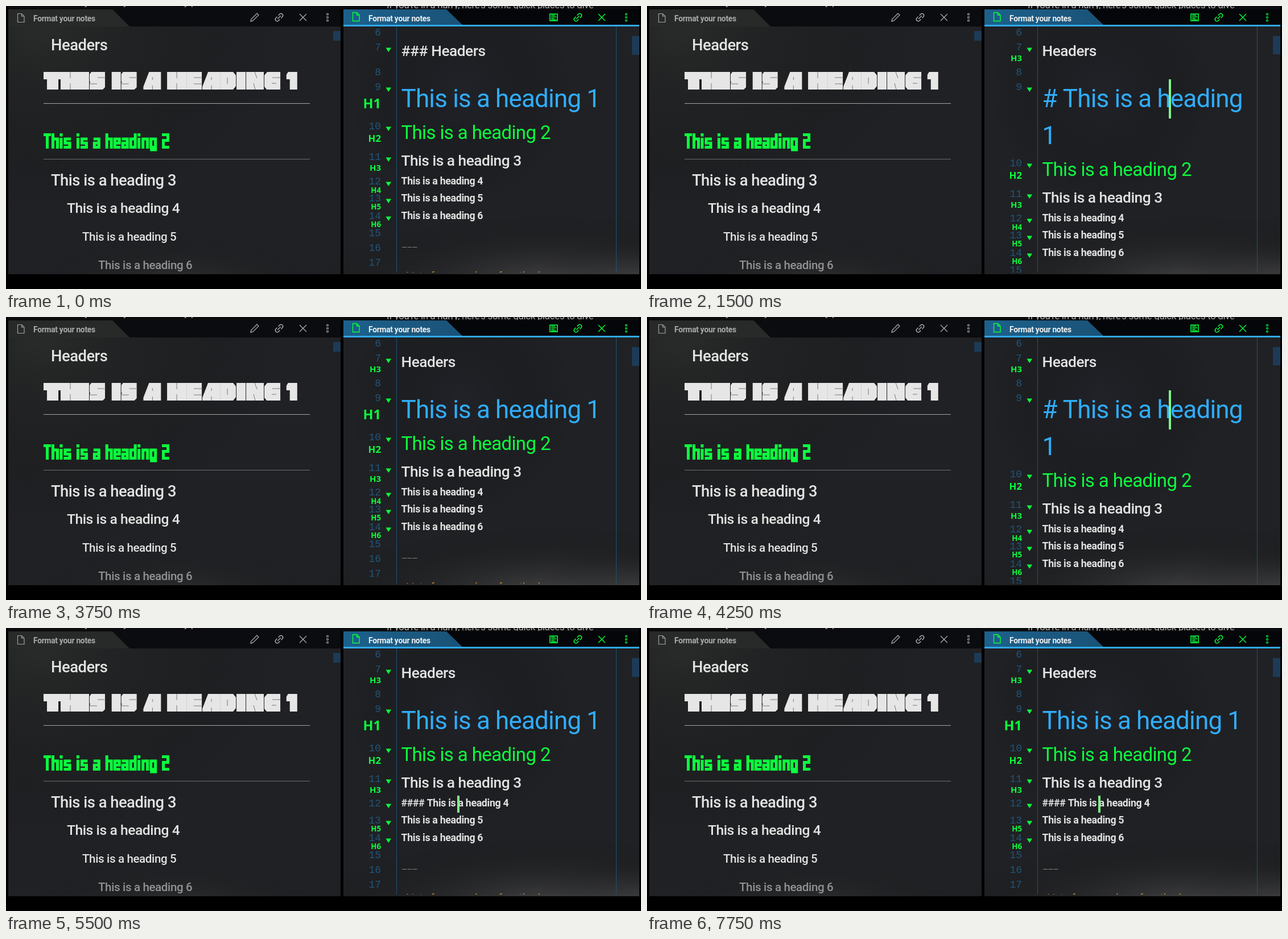
Write an HTML page with a canvas that moves like this. It is 1116 px wide and 498 px high and loops after 8 s.

```html
<!DOCTYPE html>
<html lang="en">
<head>
<meta charset="utf-8">
<title>Format your notes</title>
<style>
html, body { margin: 0; width: 100%; height: 100%; overflow: hidden; background: #000; }
canvas { display: block; }
</style>
</head>
<body>
<canvas id="stage" width="1116" height="498"></canvas>
<script>
const canvas = document.getElementById('stage');
let ctx = canvas.getContext('2d');

const LOOP = 8000;
const SANS = 'Roboto, "Open Sans", sans-serif';
const WIDE = '"Open Sans", "Noto Sans", sans-serif';
const MONO = '"Liberation Mono", monospace';
const GREEN = '#0cff3e', BLUE = '#30adfb', WHITE = '#e2e2e2';
const WRAP = 65; // extra height once the first heading breaks in two

// [start ms, line with the cursor, caret visible]
const STEPS = [
  [0, 7, 0], [250, 8, 1], [380, 9, 1], [880, 9, 0], [1500, 9, 1],
  [2000, 9, 0], [2130, 8, 1], [2750, 8, 0], [3250, 8, 1], [3750, 8, 0],
  [4250, 9, 1], [4880, 10, 1], [5000, 11, 1], [5500, 12, 1], [5880, 13, 1],
  [6380, 13, 0], [6500, 14, 1], [7000, 14, 0], [7250, 13, 1], [7750, 12, 1]
];

// caret: [x, top, bottom]
const LINES = [
  { n: 6, y: 52 },
  { n: 7, y: 78, level: 3, text: 'Headers', base: 88, tag: 97 },
  { n: 8, y: 122, caret: [693, 103, 129] },
  { n: 9, y: 148, level: 1, text: 'This is a heading 1', base: 178, tag: 180, caret: [917, 129, 198] },
  { n: 10, y: 217, level: 2, text: 'This is a heading 2', base: 234, tag: 239, caret: [862, 198, 252] },
  { n: 11, y: 271, level: 3, text: 'This is a heading 3', base: 281, tag: 290, caret: [838, 252, 295] },
  { n: 12, y: 314, level: 4, text: 'This is a heading 4', base: 314, tag: 329, caret: [793, 295, 325] },
  { n: 13, y: 344, level: 5, text: 'This is a heading 5', base: 344, tag: 358, caret: [798, 325, 356] },
  { n: 14, y: 375, level: 6, text: 'This is a heading 6', base: 375, tag: 389, caret: [801, 356, 386] },
  { n: 15, y: 405 }, { n: 16, y: 431 }, { n: 17, y: 457 }
];
const SIZE = [0, 44, 33, 26.3, 17.8, 17.8, 17.8];
const TAG = [0, 23.5, 16.8, 15, 13.3, 13.3, 13.3];

// Condensed lettering, drawn with a thick pen: [advance, path]
const THIN = {
  T: [14, 'M0 2.5H13M6.5 0V27'],
  h: [14, 'M2.5 0V27M2.5 10H10.5V27'],
  i: [7.5, 'M3 8V27M3 0V5.5'],
  s: [14, 'M12.5 10H2.5V17.2H10.5V24.5H0'],
  a: [14, 'M1 10H10.5V27M10.5 17.2H2.5V24.5H10.5'],
  e: [14, 'M12.5 24.5H2.5V10H10.5V17.2H2.5'],
  d: [14, 'M10.5 0V27M10.5 10H2.5V24.5H10.5'],
  n: [14, 'M2.5 27V10H10.5V27'],
  g: [14, 'M10.5 24.5H2.5V10H10.5V29H1'],
  2: [14, 'M0 2.5H10.5V12.5H2.5V24.5H13'],
  ' ': [7.9, '']
};
// Block lettering: [advance, outline, slits]
const BLOCK = {
  T: [30, 'M0 0H30V13H26V31H6V13H0Z', ''],
  H: [34, 'M0 0H34V31H0Z', 'M17 0V11M17 20V31'],
  I: [17, 'M0 0H16V31H0Z', ''],
  S: [28, 'M3 0H27V27L23 31H0V20L1 18L0 16V4Z', 'M14 10H28M0 21H13'],
  A: [31, 'M10 0H31V31H0V26Z', 'M16 24V31M16 9V14'],
  E: [28, 'M0 0H27V31H0Z', 'M13 10H28M13 21H28'],
  D: [29, 'M0 0H23L28 6V25L23 31H0Z', 'M13 10V21'],
  N: [32, 'M0 0H31V31H0Z', 'M15 0L19 11M13 20L16 31'],
  G: [28, 'M5 0H28V31H4L0 26V6Z', 'M14 10H28M13 20H21'],
  1: [19, 'M3 0H19V31H6V13H0V5Z', ''],
  ' ': [10.7, '', '']
};

function rect(x, y, w, h, color) {
  ctx.fillStyle = color;
  ctx.fillRect(x, y, w, h);
}

function poly(color, ...pts) {
  ctx.fillStyle = color;
  ctx.beginPath();
  for (const [x, y] of pts) ctx.lineTo(x, y);
  ctx.fill();
}

function label(str, x, y, size, color, weight = 400, family = SANS) {
  ctx.font = `${weight} ${size}px ${family}`;
  ctx.letterSpacing = family === SANS ? `${-0.019 * size}px` : '0px';
  ctx.fillStyle = color;
  ctx.fillText(str, x, y);
}

function rightLabel(str, x, ...rest) {
  ctx.textAlign = 'right';
  label(str, x, ...rest);
  ctx.textAlign = 'left';
}

function stroke(d, x, y, color, width = 1.3, turn = 0) {
  ctx.save();
  ctx.translate(x, y);
  ctx.rotate(turn);
  ctx.strokeStyle = color;
  ctx.lineWidth = width;
  ctx.stroke(new Path2D(d));
  ctx.restore();
}

function clipped(x, y, w, h, draw) {
  ctx.save();
  ctx.beginPath();
  ctx.rect(x, y, w, h);
  ctx.clip();
  draw();
  ctx.restore();
}

function fade(g, ...stops) {
  stops.forEach((c, i) => g.addColorStop(i / (stops.length - 1), c));
  return g;
}

function glow(x, y, r, color, sx = 1) {
  ctx.save();
  ctx.translate(x, y);
  ctx.scale(sx, 1);
  rect(-r, -r, 2 * r, 2 * r, fade(ctx.createRadialGradient(0, 0, 0, 0, 0, r), color, 'rgba(0,0,0,0)'));
  ctx.restore();
}

function paneBack(x, w) {
  clipped(x, 36, w, 436, () => {
    rect(x, 36, w, 436, '#202124');
    glow(60, 40, 330, 'rgba(54,60,52,.38)', 1.3);
    glow(800, 150, 200, 'rgba(36,38,50,.4)');
    glow(960, 492, 125, 'rgba(105,105,105,.55)', 3.4);
    glow(1130, 480, 80, 'rgba(115,115,115,.3)', 2.5);
    glow(300, 490, 90, 'rgba(90,90,90,.28)', 3);
  });
}

// Two open links meeting at a bar, lying flat
const LINK = 'M-1.5 -3.3H-4.7A3.3 3.3 0 0 0 -4.7 3.3H-1.5M1.5 -3.3H4.7A3.3 3.3 0 0 1 4.7 3.3H1.5M-4 0H4';

function icons(x, color) {
  stroke(LINK, x, 20, color, 1.5, -Math.PI / 4);
  stroke('M-6 -6L6 6M6 -6L-6 6', x + 42, 20, color, 1.4);
  for (const y of [14.5, 20, 25.5]) {
    ctx.strokeStyle = color;
    ctx.lineWidth = 1.2;
    ctx.beginPath();
    ctx.arc(x + 85, y, 1.5, 0, 7);
    ctx.stroke();
  }
}

const PAGE = 'M0 0H7L11.5 4.5V15H0ZM7 0V4.5H11.5';

function lettering(str, font, x, y, draw) {
  for (const ch of str) {
    const [advance, ...paths] = font[ch];
    draw(paths, x, y);
    x += advance;
  }
}

function leftPane() {
  rect(4, 6, 584, 30, '#0a0c10');
  paneBack(4, 584);
  poly('#282a29', [4, 6], [187, 6], [217, 36], [4, 36]);
  stroke(PAGE, 20.5, 13.5, '#a0a0a0', 1.2);
  label('Format your notes', 48, 27, 13.8, '#a9a9a9', 600);
  stroke('M-7 7L-6 3L4 -7L7 -4L-3 6Z', 437, 20, '#a8a8a8');
  icons(480, '#a8a8a8');
  rect(575, 44, 13, 17, '#1d3b56');

  label('Headers', 79, 78, 27.4, WHITE, 500);
  lettering('THIS IS A HEADING 1', BLOCK, 66, 116, ([body, slits], x, y) => {
    ctx.save();
    ctx.translate(x, y);
    ctx.fillStyle = '#e6e6e6';
    ctx.fill(new Path2D(body));
    ctx.restore();
    stroke(slits, x, y, '#77787a', 1);
  });
  rect(66, 171, 468, 1, '#a4a4a4');
  lettering('This is a heading 2', THIN, 66, 224, ([d], x, y) => stroke(d, x, y, GREEN, 5));
  rect(66, 269, 468, 1, '#6d6d6d');
  label('This is a heading 3', 79, 316, 27.4, WHITE, 500);
  label('This is a heading 4', 107, 364, 24.7, WHITE, 500);
  label('This is a heading 5', 134, 413, 20.6, WHITE, 500);
  label('This is a heading 6', 162, 463, 20.6, '#929292', 500);
}

function rightFrame() {
  rect(593, 6, 520, 30, '#050609');
  paneBack(593, 520);
  poly(fade(ctx.createLinearGradient(593, 0, 800, 0), '#1c618c', '#1a5277'),
    [593, 6], [774, 6], [803, 34], [593, 34]);
  rect(593, 33, 520, 3, '#2fa9ee');
  stroke(PAGE, 609.5, 11.5, GREEN, 1.4);
  label('Format your notes', 637, 27, 13.8, '#f0f0f0', 600);
  stroke('M-6.5 -6H6.5V6H-6.5Z', 962.5, 20, GREEN, 1.6);
  for (const [y, w] of [[16, 7], [18.7, 9], [21.4, 6], [24, 9]]) rect(958, y - 0.5, w, 1.5, GREEN);
  icons(1005, GREEN);
  rect(686, 36, 1, 433, '#1d5378');
  rect(1072, 36, 1, 433, '#1d5378');
}

function overflowText() {
  rect(4, 0, 1109, 6, '#0b0c0e');
  clipped(4, 0, 1109, 5, () => {
    label('If you\'re in a hurry, here\'s some quick places to dive', 669, 4, 16.9, '#b0b0b0');
    for (const [ch, x] of [['y', 138], ['y', 206], ['y', 313], ['p', 325]]) label(ch, x, -1, 17, '#b0b0b0');
  });
}

function gutter(line, shift, active) {
  rightLabel(line.n, 659, line.y + shift, 18, '#21557a', 400, MONO);
  if (!line.level) return;
  const y = line.y + shift - 1;
  poly(GREEN, [667.5, y - 3.5], [677, y - 3.5], [672.2, y + 4]);
  if (!active) rightLabel('H' + line.level, 659, line.tag + shift, TAG[line.level], GREEN, 700, WIDE);
}

function heading(line, shift, active) {
  const { level } = line;
  const color = [0, BLUE, GREEN][level] || WHITE;
  const weight = [0, 400, 400, 500][level] || 600;
  const put = (str, y) => label(str, 694.5, y + shift, SIZE[level], color, weight);
  const str = active ? '#'.repeat(level) + ' ' + line.text : line.text;
  if (active && level === 1) {
    put(str.slice(0, -2), line.base);
    put(str.slice(-1), line.base + WRAP);
  } else put(str, line.base);
}

function editor(current, caretOn) {
  const wrapped = current === 9;
  rect(1100, 53, 13, wrapped ? 32 : 33, '#1d3b56');
  clipped(593, 36, 507, 433, () => {
    for (const line of LINES) {
      const shift = wrapped && line.n > 9 ? WRAP : 0;
      const active = line.n === current;
      gutter(line, shift, active);
      if (line.level) heading(line, shift, active);
      if (active && caretOn) {
        const [x, top, bottom] = line.caret;
        rect(x, top, 4, bottom - top, '#80f58a');
      }
    }
    if (wrapped) return;
    for (let i = 0; i < 3; i++) rect(696 + 9.3 * i, 424, 8, 1, '#858585');
    label('Lists for a number of methods', 703, 481, 19, '#c9952e');
  });
}

// Everything that never changes is painted once.
const still = document.createElement('canvas');
still.width = canvas.width;
still.height = canvas.height;
const screen = ctx;
ctx = still.getContext('2d');
rect(0, 0, 1116, 498, '#000');
overflowText();
leftPane();
rightFrame();
ctx = screen;

function frame(now) {
  const t = now % LOOP;
  const [, line, caretOn] = STEPS.findLast(step => step[0] <= t);
  ctx.drawImage(still, 0, 0);
  editor(line, caretOn);
  requestAnimationFrame(frame);
}
requestAnimationFrame(frame);
</script>
</body>
</html>
```
